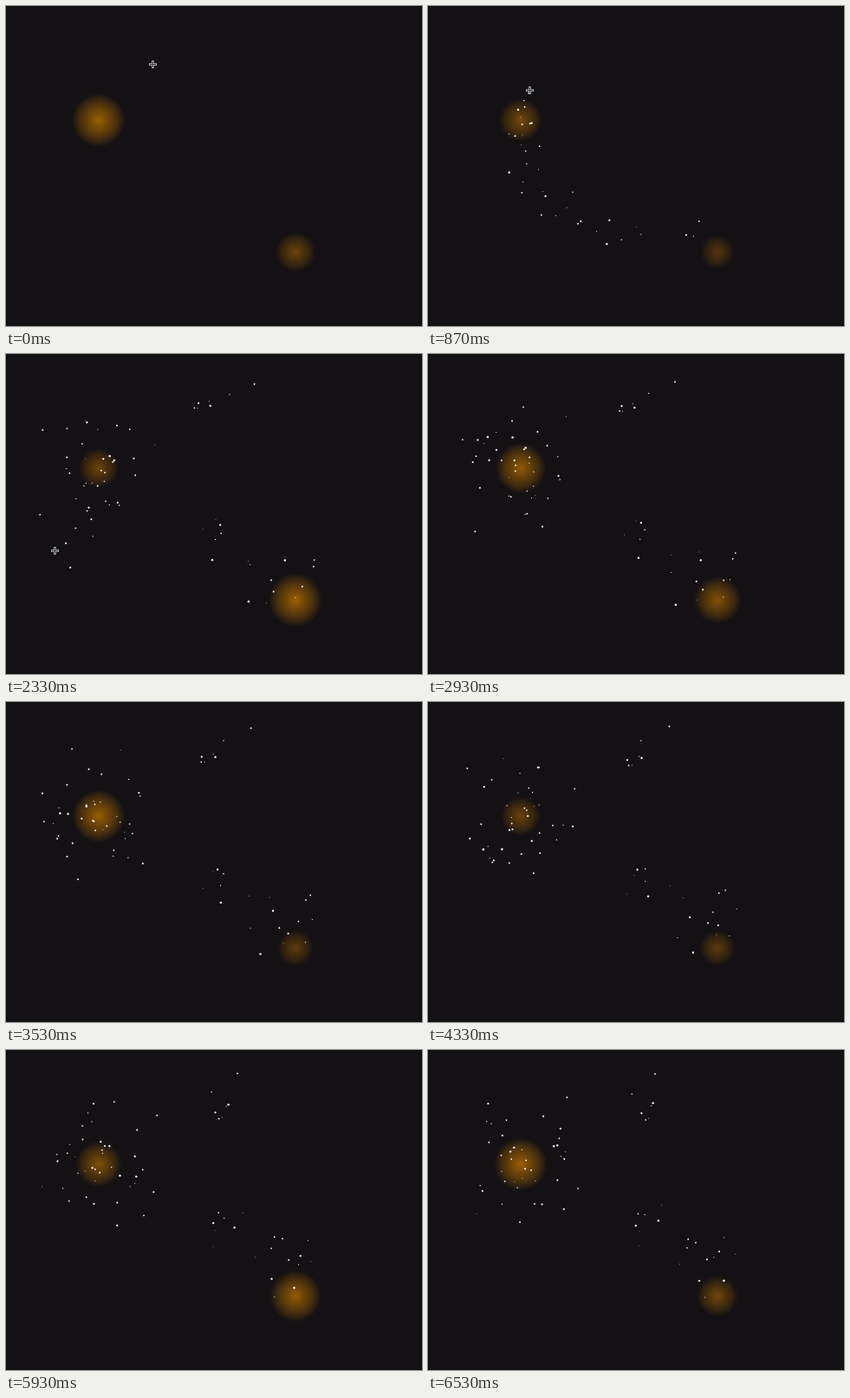
An HTML page with a canvas for the animation above (6.59 s loop, 480x370 px).

```html
<!DOCTYPE html>
<html lang="en">
<head>
<meta charset="utf-8">
<title>Gravity wells</title>
<style>
html, body { margin: 0; width: 100%; height: 100%; overflow: hidden; background: #131114; }
canvas { display: block; }
</style>
</head>
<body>
<canvas id="stage" width="480" height="370"></canvas>
<script>
const ctx = document.getElementById('stage').getContext('2d');
const TAU = Math.PI * 2;
const LOOP = 6590, FRAME = 1000 / 15, PULSE = LOOP / 2;
const HOP = 157;            // time between two points of the swing
const SPRAY = 270;          // first dot leaves the pointer
const POINTER_END = 2640;

const wells = [{ x: 107, y: 132, peak: 30 }, { x: 334, y: 284.5, peak: 2310 }];

let seed = 29;
function rnd(a = 0, b = 1) {
  seed = (seed * 1664525 + 1013904223) % 4294967296;
  return a + (b - a) * seed / 4294967296;
}

// Smooth curve through [time, x, y] keys.
function follow(keys, t) {
  const last = keys.length - 1;
  if (t <= keys[0][0]) return keys[0].slice(1);
  if (t >= keys[last][0]) return keys[last].slice(1);
  let i = 0;
  while (keys[i + 1][0] < t) i++;
  const p = keys[i], q = keys[i + 1], span = q[0] - p[0], u = (t - p[0]) / span;
  const slope = (k, c) => {
    const a = keys[Math.max(k - 1, 0)], b = keys[Math.min(k + 1, last)];
    return (b[c] - a[c]) / (b[0] - a[0]) * span;
  };
  const u2 = u * u, u3 = u2 * u;
  return [1, 2].map(c =>
    (2 * u3 - 3 * u2 + 1) * p[c] + (u3 - 2 * u2 + u) * slope(i, c) +
    (3 * u2 - 2 * u3) * q[c] + (u3 - u2) * slope(i + 1, c));
}

const drag = [
  [SPRAY, 124, 64.5], [900, 117, 100], [1533, 125.5, 147.5],
  [2200, 78, 222], [2333, 56.5, 227], [POINTER_END, 41, 236]
];
function pointer(t) {
  if (t > SPRAY) return follow(drag, t);
  const u = Math.min(t / (2 * FRAME), 1);
  return [169.5 - 45.5 * u, 67 - 2.5 * u];
}

// The big swing: down past the first well, round the second and back.
const swing = [[108, 165], [150, 230], [235, 270], [325, 240], [290, 150], [229, 60], [140, 80]];

function swingKeys(birth, hops) {
  const dx = rnd(-18, 18), dy = rnd(-18, 18);
  return [[birth, ...pointer(birth)],
    ...swing.slice(0, hops).map(([x, y], i) => [birth + HOP * (i + 1), x + dx, y + dy])];
}

// Counterclockwise tilted ellipse, faster near the middle.
function orbit({ x, y, rx, ry, rate }) {
  const far = rnd(0.1, 1), phase = rnd(0, TAU), tilt = rnd(-0.7, 0.7);
  const speed = rate / (0.3 + far) / 1000;
  return t => {
    const a = phase - speed * t;
    return [x + rx * far * Math.cos(a), y + ry * far * Math.sin(a + tilt)];
  };
}

const dots = [];
function addDot(keys, end, path) {
  keys.push([end, ...path(end)], [end + FRAME, ...path(end + FRAME)]);
  const size = 0.4 + 0.85 * rnd();
  dots.push({ birth: keys[0][0], size, at: t => t < end ? follow(keys, t) : path(t) });
}

// Early dots make the whole swing before the first well catches them, late ones fall straight in.
const cloud = { x: 106, y: 129, rx: 70, ry: 80, rate: 1.1 };
for (let i = 0; i < 24; i++) {
  const birth = SPRAY + i * 28;
  addDot(swingKeys(birth, swing.length), birth + HOP * 8, orbit(cloud));
}
for (let i = 0; i < 16; i++) {
  const birth = 1200 + i * 68, [x, y] = pointer(birth);
  const keys = [[birth, x, y], [birth + 180, x + rnd(-15, 18), y + rnd(-5, 25)]];
  addDot(keys, birth + 800, orbit(cloud));
}

// Some leave the swing part way and drift slowly.
const drifts = [
  { x: 248, y: 54, rx: 40, ry: 28, rate: 0.3, hops: 5, count: 7 },
  { x: 243, y: 200, rx: 42, ry: 68, rate: 0.3, hops: 2, count: 7 },
  { x: 316, y: 252, rx: 45, ry: 42, rate: 0.5, hops: 3, count: 12 }
];
for (const drift of drifts) {
  for (let i = 0; i < drift.count; i++) {
    const birth = 1480 - HOP * (drift.hops + rnd(0, 1.8));
    addDot(swingKeys(birth, drift.hops), birth + HOP * drift.hops + 850, orbit(drift));
  }
}

function drawWell({ x, y, peak }, t) {
  const wave = Math.cos((t - peak) / PULSE * TAU);
  const r = 25 + 6 * wave, glow = 0.66 + 0.24 * wave;
  const tone = a => `rgba(170,104,0,${a * glow})`;
  const fill = ctx.createRadialGradient(x, y, 0, x, y, r);
  fill.addColorStop(0, tone(1));
  fill.addColorStop(0.7, tone(0.36));
  fill.addColorStop(1, tone(0));
  ctx.fillStyle = fill;
  ctx.beginPath();
  ctx.arc(x, y, r, 0, TAU);
  ctx.fill();
}

function cross(x, y, reach, width, color) {
  ctx.fillStyle = color;
  ctx.fillRect(x - reach, y - width / 2, reach * 2, width);
  ctx.fillRect(x - width / 2, y - reach, width, reach * 2);
}

function draw(t) {
  ctx.fillStyle = '#131114';
  ctx.fillRect(0, 0, 480, 370);
  wells.forEach(w => drawWell(w, t));
  ctx.fillStyle = '#fff';
  for (const d of dots) {
    if (t < d.birth) continue;
    const [x, y] = d.at(t);
    ctx.beginPath();
    ctx.arc(x + 0.5, y + 0.5, d.size, 0, TAU);
    ctx.fill();
  }
  if (t < POINTER_END) {
    const [x, y] = pointer(t).map(v => Math.floor(v) + 0.5);
    cross(x, y, 4.5, 2.4, '#c8c8ca');
    cross(x, y, 3.5, 1, '#3a383b');
  }
}

const start = performance.now();
function tick() {
  const t = (performance.now() - start) % LOOP;
  draw(Math.floor((t + 4) / FRAME) * FRAME);
  requestAnimationFrame(tick);
}
tick();
</script>
</body>
</html>
```
